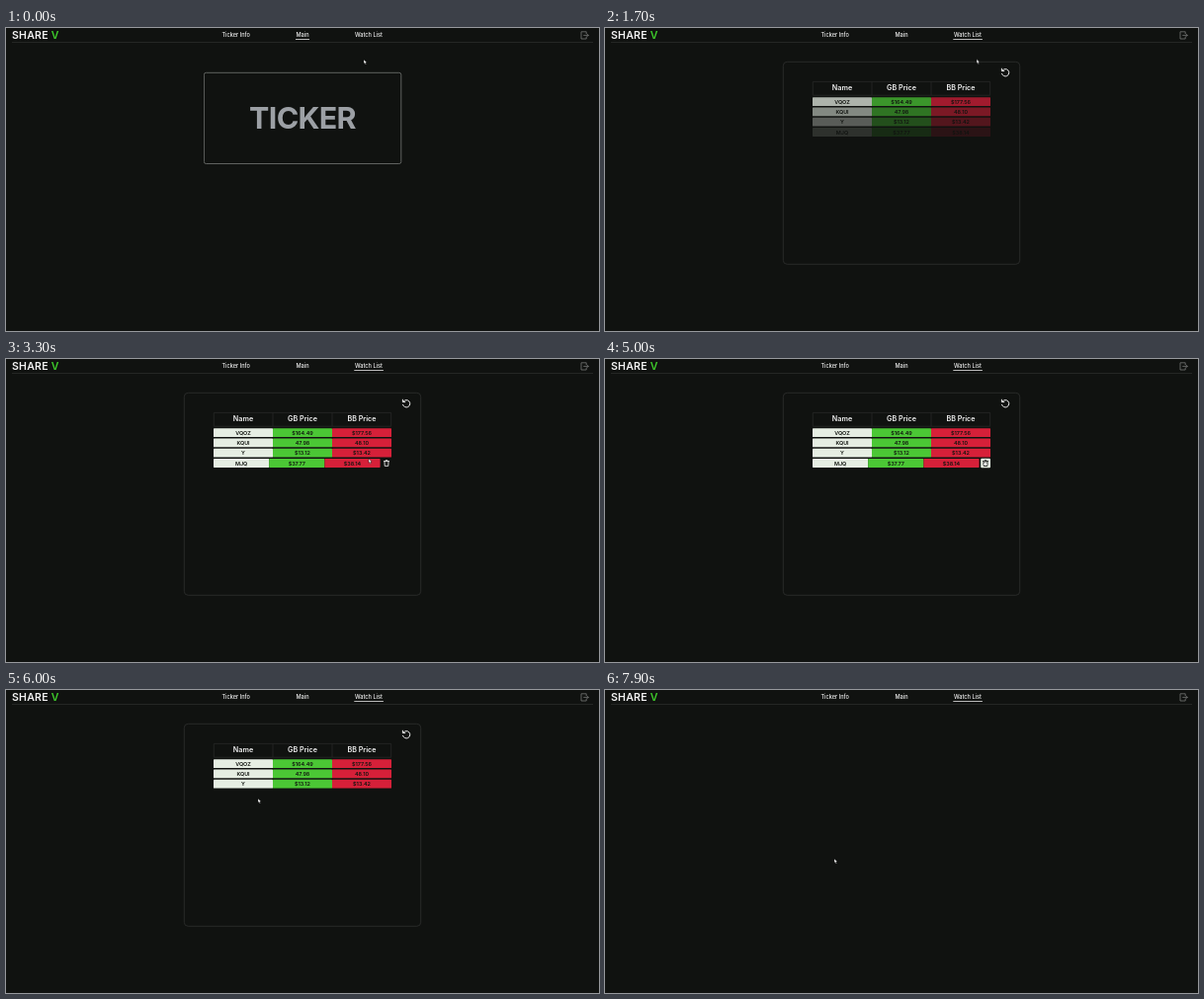
An HTML page that plays this animation: 600 px wide and 307 px high, repeating every 8 s.

```html
<!DOCTYPE html>
<html lang="en">
<head>
<meta charset="utf-8">
<title>Watch list</title>
<style>
html, body { margin: 0; width: 100%; height: 100%; overflow: hidden; background: #101210; }
svg { display: block; width: 100vw; height: 100vh; }
text { font-family: Inter, "Open Sans", sans-serif; font-weight: 600; text-anchor: middle; fill: #f2f2f2; }
.line { fill: none; stroke-linecap: round; stroke-linejoin: round; }
.nav { font-size: 5.6px; font-weight: 500; }
.logo { font-size: 10.6px; text-anchor: start; letter-spacing: .2px; }
.head { font-size: 7.2px; }
.cell text { font-size: 5.4px; fill: #10140f; }

/* every part shares one 8 s clock */
.main, .watch, .at-main, .at-watch, .list, .row, .over, .hot, .cursor, .arrow, .hand {
  animation: 8s linear infinite both;
}
.at-main, .at-watch, .list, .over, .hot, .arrow, .hand { animation-timing-function: step-end; }

.main { animation-name: main; }
@keyframes main { 0%, 10.4% { opacity: 1 } 14.8%, 100% { opacity: 0 } }
.watch { animation-name: watch; }
@keyframes watch { 0%, 15.6% { opacity: 0 } 20%, 93.2% { opacity: 1 } 98.2%, 100% { opacity: 0 } }
.at-main { animation-name: at-main; }
@keyframes at-main { 0% { opacity: 1 } 15.9%, 100% { opacity: 0 } }
.at-watch { animation-name: at-watch; }
@keyframes at-watch { 0% { opacity: 0 } 15.9%, 100% { opacity: 1 } }

.before { animation-name: before; }
@keyframes before { 0% { opacity: 1 } 63.25%, 100% { opacity: 0 } }
.after { animation-name: after; }
@keyframes after { 0% { opacity: 0 } 63.25%, 100% { opacity: 1 } }
.row { animation-delay: calc(var(--i) * .1s); }
.before .row { animation-name: enter; }
@keyframes enter { 0%, 16.6% { opacity: 0 } 22.9%, 100% { opacity: 1 } }
.after .row { animation-name: refill; }
@keyframes refill { 0%, 63.25% { opacity: 0 } 69.5%, 100% { opacity: 1 } }

/* row hover, one track per row */
.over0 { animation-name: over0; }
@keyframes over0 { 0%, 30.9%, 86.3%, 100% { opacity: 0 } 30.4%, 84.6% { opacity: 1 } }
.over1 { animation-name: over1; }
@keyframes over1 { 0%, 31.6%, 38.7%, 84.3%, 100% { opacity: 0 } 31%, 36.5%, 82.5% { opacity: 1 } }
.over2 { animation-name: over2; }
@keyframes over2 { 0%, 32.2%, 36.4%, 40.4%, 82.3%, 100% { opacity: 0 } 31.7%, 35.5%, 39%, 80.7% { opacity: 1 } }
.over3 { animation-name: over3; }
@keyframes over3 { 0%, 35.3%, 63.25%, 100% { opacity: 0 } 32.3%, 40.5% { opacity: 1 } }
.hot { animation-name: hot; }
@keyframes hot { 0%, 63.25%, 100% { opacity: 0 } 57% { opacity: 1 } }

.cursor { animation-name: move; }
@keyframes move {
  0%, 3.75% { transform: translate(362px, 32px); animation-timing-function: ease-in-out }
  8.75%, 11.9% { transform: translate(367px, 6px) }
  15% { transform: translate(368px, 10px) }
  21% { transform: translate(376px, 31.5px) }
  26.25%, 28.1% { transform: translate(376px, 34px) }
  32.5%, 35% { transform: translate(366px, 104px) }
  36.9%, 38.1% { transform: translate(365px, 86px) }
  40.6% { transform: translate(367px, 101px) }
  48.75%, 50% { transform: translate(367px, 102px) }
  57.5%, 65.6% { transform: translate(384px, 103px) }
  69.4% { transform: translate(340px, 121px) }
  71.9% { transform: translate(300px, 120px) }
  75% { transform: translate(255px, 110px) }
  78.75% { transform: translate(250px, 110px) }
  86.25% { transform: translate(238px, 70px) }
  90%, 94.5% { transform: translate(233px, 7px) }
  98.6%, 100% { transform: translate(232px, 171px) }
}
.arrow { animation-name: arrow; }
@keyframes arrow { 0%, 13.5%, 64.5%, 94.8%, 100% { opacity: 1 } 8%, 57%, 89.6% { opacity: 0 } }
.hand { animation-name: hand; }
@keyframes hand { 0%, 13.5%, 64.5%, 94.8%, 100% { opacity: 0 } 8%, 57%, 89.6% { opacity: 1 } }
</style>
</head>
<body>
<svg viewBox="0 0 600 307" preserveAspectRatio="none">
  <defs>
    <g id="bin" class="line" stroke-width=".85">
      <path d="M-2.6 -2h5.2M-.9 -2.1v-.8h1.8v.8M-2 -1.9l.2 4.7h3.6l.2-4.7"/>
    </g>
  </defs>
  <rect width="600" height="307" fill="#101210"/>

  <text class="logo" x="6" y="11.2">SHARE <tspan fill="#3ecb2b">V</tspan></text>
  <text class="nav" x="232.7" y="9.4">Ticker Info</text>
  <text class="nav" x="300" y="9.4">Main</text>
  <text class="nav" x="367" y="9.4">Watch List</text>
  <path class="at-main" d="M293 11.5h14" stroke="#e4e4e4" stroke-width=".8"/>
  <path class="at-watch" d="M352.3 11.5h29.6" stroke="#e4e4e4" stroke-width=".8"/>
  <path d="M6 14.6h588" stroke="#343634" stroke-width=".7"/>
  <path class="line" d="M587.2 5.6v-1.8h-5.2v7.2h5.2v-1.8M584.6 7.4h4.6m-1.4-1.4l1.4 1.4l-1.4 1.4" stroke="#7c7e7c" stroke-width=".75"/>

  <g class="main">
    <rect x="200.4" y="45.3" width="199.4" height="92.2" rx="2" fill="none" stroke="#757875" stroke-width=".8"/>
    <text x="300" y="102.2" font-size="30.5" style="font-weight:700;letter-spacing:-.7px" fill="#9ca0a5" id="ticker">TICKER</text>
  </g>

  <g class="watch">
    <rect x="180.3" y="34.3" width="239.4" height="205" rx="4" fill="none" stroke="#303230" stroke-width=".8"/>
    <g class="line" stroke="#eee" stroke-width="1">
      <path d="M402.2 42.9a3.7 3.7 0 1 1 -.7 3.4M401.4 41.2v2.4h2.4"/>
    </g>
    <path d="M210.3 54.4h179.4v13.8h-179.4zM270 54.4v13.8M330 54.4v13.8" fill="none" stroke="#2b2d2b" stroke-width=".7"/>
    <text class="head" x="240" y="63.4">Name</text>
    <text class="head" x="300" y="63.4">GB Price</text>
    <text class="head" x="360" y="63.4">BB Price</text>
    <g class="list before"></g>
    <g class="list after"></g>
  </g>

  <g class="cursor" stroke="#111" stroke-width=".4" fill="#fff">
    <path class="arrow" d="M0 0v4.2l1-.9l.7 1.6l.8-.4l-.7-1.5h1.3z"/>
    <path class="hand" d="M-.5 .2q.5-.6 1 0v1.7l2 .5q.5.2.4.8l-.4 1.9h-2.7l-1.3-2q0-.7.7-.4l.3.3z"/>
  </g>
</svg>
<script>
const rows = [
  ["VQOZ", "$164.49", "$177.56"],
  ["KQUI", "47.98", "48.10"],
  ["Y", "$13.12", "$13.42"],
  ["MJQ", "$37.77", "$38.14"]
];
const fills = ["#e6eee3", "#4bc735", "#d62039"];

const cells = (row, y, w) => row.map((label, k) => {
  const x = 210 + k * w;
  return `<g class="cell"><rect x="${x}" y="${y}" width="${w}" height="8.8" rx=".6" fill="${fills[k]}"/>
    <text x="${x + w / 2}" y="${y + 6.4}">${label}</text></g>`;
}).join("");

const bin = (y, color) => `<use href="#bin" x="385" y="${y + 4.5}" stroke="${color}"/>`;

function rowMarkup(row, i) {
  const y = 70.2 + i * 10.3;
  const hot = i < 3 ? "" :
    `<g class="hot"><rect x="380.2" y="${y - .4}" width="9.8" height="9.6" rx="1" fill="#e6eee3"/>${bin(y, "#1a1c1a")}</g>`;
  return `<g class="row" style="--i:${i}">${cells(row, y, 60)}
    <g class="over over${i}">
      <rect x="209.5" y="${y - .3}" width="181" height="9.4" fill="#101210"/>
      ${cells(row, y, 56.2)}${bin(y, "#f0f0f0")}${hot}
    </g></g>`;
}

document.querySelector(".before").innerHTML = rows.map(rowMarkup).join("");
document.querySelector(".after").innerHTML = rows.slice(0, 3).map(rowMarkup).join("");
document.querySelector("#ticker").style.fill = "#9ca0a5";
document.querySelector("tspan").style.fill = "#3ecb2b";
</script>
</body>
</html>
```
